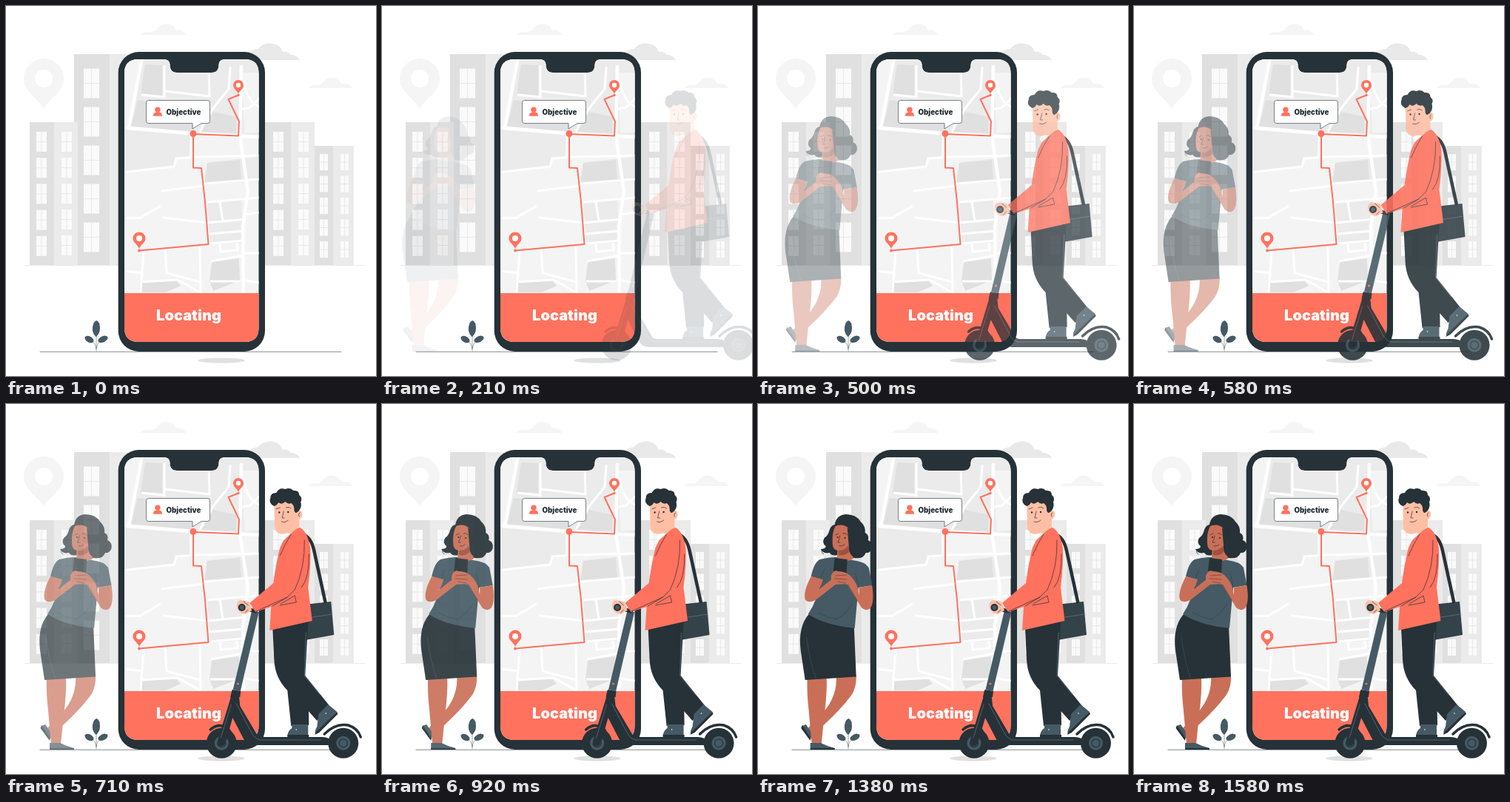
An HTML page for the animation above (1620 ms loop, 500x500 px).

```html
<!DOCTYPE html>
<html lang="en">
<head>
<meta charset="utf-8">
<title>Locating</title>
<style>
html, body { margin: 0; width: 100%; height: 100%; overflow: hidden; background: #fff; }
svg { display: block; width: 100vw; height: 100vh; }
text { font-family: Inter, Roboto, sans-serif; font-weight: 900; }
.dk { fill: #263238; }
.md { fill: #455a64; }
.red { fill: #ff725e; }
.brown { fill: #ca6f57; }
.peach { fill: #ffbfa5; }
.ln { fill: none; stroke: #263238; stroke-width: .7; stroke-linecap: round; stroke-linejoin: round; }
.lt { fill: none; stroke: #78909c; stroke-width: .5; stroke-linecap: round; }
</style>
</head>
<body>
<svg viewBox="0 0 500 500" xmlns="http://www.w3.org/2000/svg">
<defs>
  <clipPath id="screen"><path d="M179 72H213Q221 72 221.500 79Q221.500 90 231 90H278Q287.500 90 287.500 79Q288 72 296 72H323Q341.500 72 341.500 91V435Q341.500 454 323 454H179Q160 454 160 435V91Q160 72 179 72Z"/></clipPath>
</defs>

<path fill="#f5f5f5" d="M182 39Q184 34 197 35Q203 34 206 29Q210 24 218 24Q227 25 229 32Q241 32 243 39Z"/>
<path fill="#e9e9e9" d="M323 73Q325 60 341 58Q346 50 358 50.500Q370 51 374 62Q380 60 385 66Q395 67 397 73Z"/>
<path fill="#f5f5f5" d="M409 111Q411 106 422 107Q427 106 430 101Q434 96 441 96.500Q450 98 453 105Q466 104 469 111Z"/>
<path fill="#f5f5f5" fill-rule="evenodd" d="M51 139C45 126 24 117 24 98A27 27 0 0 1 78 98C78 117 57 126 51 139ZM51 86A12 12 0 1 0 51 110A12 12 0 1 0 51 86Z"/>
<g id="city"></g>
<path stroke="#ebebeb" stroke-width="1" d="M25 350.500H485"/>
<ellipse cx="291" cy="479" rx="32" ry="3.500" fill="#e0e0e0"/>
<path class="ln" stroke-opacity=".8" d="M46 467.300H453"/>

<rect class="dk" x="151.700" y="62" width="198.300" height="405" rx="28"/>
<g clip-path="url(#screen)">
  <path fill="#f4f4f4" d="M155 70H345V460H155Z"/>
  <path fill="#ebebeb" d="M160 72H342V176L160 165ZM160 167L250 175V204L229 206L227 217L160 225ZM272 211L342 204V236L268 241ZM272 265L318 262L321 320L276 322Z"/>
  <path fill="#f4f4f4" d="M160 72H182L167 163H160ZM318 90H342V170L322 172ZM258 204L253 176L316 178L319 204Z"/>
  <path fill="#e0e0e0" d="M188 79L211 80V122L182 119ZM178 127L256 133L252 170L169 162ZM280 143L312 150L311 172L262 170ZM272 212L316 208L318 236L268 238ZM182 374L230 371L236 378L216 387H182ZM278 346L315 341L316 371L280 385L275 372Z"/>
  <g fill="none" stroke="#fff" stroke-width="3">
    <path stroke-width="4.500" d="M160 164.500L252 172L342 177M184 70L166 165M318 80L316 175L327 250L320 300L321 390"/>
    <path d="M183 120L214 123L214 80M214 115L275 122L274 80M303 82L301 112L280 138L262 170M250 175V205M160 224.500L227 217L230 206L258 204L342 202M268 240L342 234M342 125L330 137L316 140M321 100Q326 130 342 136"/>
    <path d="M160 286.500H181L209 270M210 250L268 243M212 286L272 293L324 288M272 265L342 259M289 265L293 290M274 308L322 304M276 321L321 317M186 331L182 388M215 327L217 361L263 373M262 323L263 388M182 373L232 370L264 388M277 345L320 337M276 372L317 372M318 370L342 374M160 358L185 361M321 334H342M322 282L342 279M289 322L290 332L313 330L312 320"/>
  </g>
  <rect class="red" x="155" y="388" width="190" height="70"/>
</g>
<text x="247" y="425" text-anchor="middle" font-size="20" fill="#fff">Locating</text>
<path fill="none" stroke="#ff725e" stroke-width="2" stroke-linejoin="round" d="M180 330.500L273.500 322L269 265L264 219L253 218.500V173L314 175.500L315 156L300.500 126L314 120.500"/>
<g class="red">
  <circle cx="180" cy="330.500" r="1.900"/><circle cx="314" cy="120.500" r="1.700"/><circle cx="253" cy="172.500" r="4.500"/>
  <path d="M180 328C178 322 171.500 320 171.500 314A8.500 8.500 0 0 1 188.500 314C188.500 320 182 322 180 328Z"/>
  <path d="M314 118.500C312 114 307 112 307 107A7 7 0 0 1 321 107C321 112 316 114 314 118.500Z"/>
</g>
<circle cx="180" cy="314" r="4" fill="#fff"/><circle cx="314" cy="107" r="3.200" fill="#fff"/>
<path fill="#fff" stroke="#263238" stroke-width=".6" d="M192.500 127.500H272.500Q275.500 127.500 275.500 130.500V155.500Q275.500 158.500 272.500 158.500H264L252 166V158.500H192.500Q189.500 158.500 189.500 155.500V130.500Q189.500 127.500 192.500 127.500Z"/>
<g class="red"><circle cx="205" cy="140.300" r="3.700"/><path d="M199 148.800Q199 143.800 203 143.800H207Q211 143.800 211 148.800Z"/></g>
<text class="dk" x="240" y="147" text-anchor="middle" font-size="9.700">Objective</text>

<path class="ln" stroke-opacity=".6" d="M122 466V444M122 463Q121 455 114 451M122 463Q123 455 130 451"/>
<g class="md">
  <path d="M121.500 447Q116 442 117 434Q118 426 122.500 425Q127 427 127 435Q127 443 121.500 447Z"/>
  <ellipse cx="112.500" cy="450.500" rx="6.500" ry="4" transform="rotate(30 112.500 450.500)"/>
  <ellipse cx="131" cy="450.300" rx="7" ry="4" transform="rotate(-25 131 450.300)"/>
</g>

<g id="woman" opacity="0">
  <path class="brown" d="M104 366L131 366Q132 386 121 398Q104 420 70 449L64 440L86 417Q106 395 104 366Z"/>
  <path class="md" d="M58 435L63 433L72 446L69 454L65 449Z"/>
  <path class="dk" d="M58 434L56.500 438L66 451L69 455V451Z"/>
  <path class="brown" d="M65 368H91Q92 390 88 420L84 460H71L67 415Q64 390 65 368Z"/>
  <path class="md" d="M69 458H83Q93 463 102 465V467H69Z"/><path class="dk" d="M69 465H102V467H69Z"/>
  <path class="dk" d="M68 283Q52 300 56 333L62 373L131 368.500L128 298Z"/>
  <path class="lt" stroke-opacity=".45" d="M64 315Q68 347 77 372"/>
  <path class="md" d="M82 210Q94 207 104 207L126 211Q143 213 148 221L152.500 245L134 248L129 303Q89 299 66 284Q79 265 83 237L70 233Q74 214 82 210Z"/>
  <path class="ln" stroke-opacity=".5" d="M83 237Q85 229 88 224M134 247L130 229M79 282Q92 289 105 291M126 270Q115 286 104 291"/>
  <path class="dk" d="M102 163Q104 150 117 149Q131 149 137 159Q144 165 143 174Q149 177 147 184Q154 187 152.500 195Q150 202 144 201Q141 210 128 208L106 204Q98 206 95 201Q86 203 83 196Q90 196 90 192Q84 188 88 181Q93 178 95 170Q97 164 102 163Z"/>
  <path class="brown" d="M106 192L122 188L127 209Q118 216 105 208Z"/>
  <path fill="#9f503e" d="M107 197Q115 196 120 190L121 200Q115 206 107 204Z"/>
  <path class="brown" d="M103 165Q113 161 121 168Q126 178 121 190Q116 199 106 198Q99 197 99 188Q98 174 103 165Z"/>
  <path class="dk" d="M119 167Q129 172 127 183Q134 194 127 206Q120 202 121 191Z"/>
  <g class="ln"><path d="M109 178Q108 185 106 187H109M108 192Q112 193 115 190M103 177L107 175M113 175Q117 174 119 177"/><path d="M86 196Q82 200 87 203M145 184Q151 187 149 195"/></g>
  <circle class="dk" cx="106" cy="180" r="1.100"/><circle class="dk" cx="116" cy="181" r="1.100"/>
  <path class="brown" d="M70 233L86 237Q84 246 79 252L99 236L110 230L119 234Q124 239 119 243L103 244L76 265Q66 270 62 264Q59 254 70 233Z"/>
  <path class="brown" d="M135 248L152.500 245Q156 268 150 276Q144 281 138 275L119 244L101 240Q99 235 104 231L116 228Q125 231 132 245L135 258Z"/>
  <path class="dk" d="M102 208L119 210L118 228L100 226Z"/>
  <path class="brown" d="M97 232Q101 223 106 226Q116 226 123 232Q125 240 117 243L103 243Q96 240 97 232Z"/>
  <path class="ln" stroke-opacity=".65" d="M103 232L118 231M102 236L118 237M106 240L117 242M120 244L132 265"/>
</g>

<g id="man" opacity="0">
  <path fill="#344249" d="M404 271L440 267L444 312L405 319Z"/>
  <path class="lt" d="M409 289L442 284"/>
  <path fill="none" stroke="#263238" stroke-width="4.500" d="M402 176Q413 180 417 198L432.500 269"/>
  <g id="wheels"></g>
  <path fill="none" stroke="#263238" stroke-width="3.500" stroke-linecap="round" d="M277 440Q287 431 299 437Q306 443 306 453M431 446Q446 431 463 434Q476 438 480 450"/>
  <path class="dk" d="M304 398L306 387L315 388L317 408L340 447Q342 450 347 450H425Q437 449 441 456L438 461H336Q327 461 322 453L307 424L297 459Q293 465 287 461V454Z"/>
  <path class="lt" d="M312 405L332 443Q336 452 344 454H426M305 406L291 451"/>
  <path class="md" d="M333 279L342.500 281L317.500 388L307.500 386Z"/>
  <path class="dk" d="M306.500 386L318 388L317 396L304 396Z"/>
  <circle class="red" cx="314" cy="378" r="1.500"/>
  <path fill="none" stroke="#263238" stroke-width="5" stroke-linecap="round" d="M318 275L338 280"/>
  <path class="dk" d="M366 300L409 294L405 367L438 408L421 428L390 393L368 365Z"/>
  <path class="md" d="M423 419L436 406L448 416Q439 426 431 435L419 446Q417 443 421 436Z"/>
  <path class="dk" d="M448 416L449 419L424 444L418 447L419 444Z"/>
  <path class="dk" d="M361 302L402 297L404 365Q410 386 410 434L386 435L381 387Q364 370 363 345Z"/>
  <path class="md" d="M387 433H409V448H381Q382 441 387 438Z"/><path class="dk" d="M381 447H410V450H381Z"/>
  <path class="lt" d="M406 309L404 367L425 393"/>
  <g fill="#fff"><circle cx="393" cy="440" r=".8"/><circle cx="433" cy="418" r=".8"/></g>
  <path class="peach" d="M379 157L397 155V172L380 181L375 176Z"/>
  <path fill="#fff" d="M375 174L386 175L396 167L398 172L377 188L373 180Z"/>
  <path class="red" d="M376 184L387 174Q393 168 398 167Q409 173 412 196Q413 216 409 248L414.500 293L357 306L359 274L338 281L330 269L362 242Q366 213 371 194Z"/>
  <path class="ln" d="M404 184Q405 221 391 251L381 261L339 280M386 176Q378 188 371 205M361 273L381 261M372 270L391 259L393 268L371 272M410 203Q411 235 400 248"/>
  <path class="peach" d="M329 267L333 279L324 284Q315 283 313 276Q311 267 317 265Z"/>
  <circle class="dk" cx="319.500" cy="275" r="5"/><circle class="md" cx="319.500" cy="275" r="3"/>
  <path class="ln" d="M322 267L328 272M324 282L328 278"/>
  <path class="peach" d="M363 131L392 128L394 145Q401 142 401 149Q401 156 395 156Q393 168 384 173Q376 177 370 175Q365 173 364 167Z"/>
  <path class="dk" d="M363 138Q355 134 358 127Q358 120 366 120Q370 112 378 115Q385 112 389 117Q397 116 397 123Q402 127 399 132Q401 140 396 145L393 147Q390 147 390 141Q390 137 386 134Q382 136 378 132Q373 137 369 133Q367 137 363 138Z"/>
  <path class="ln" d="M376 145L374 154L377 154M373 159Q378 161 382 157M366 142L371 140M379 140Q383 138 386 141M398 147Q395 148 397 152"/>
  <circle class="dk" cx="370" cy="146.500" r="1.200"/><circle class="dk" cx="382" cy="146" r="1.200"/>
</g>
</svg>
<script>
const $ = id => document.getElementById(id);
const rect = (x, y, w, h, fill) => `<rect x="${x}" y="${y}" width="${w}" height="${h}" fill="${fill}"/>`;

function windows(x, y, w, h, step) {
  let s = '';
  for (let i = 0; i < 5; i++) {
    const top = y + i * step;
    s += rect(x, top, w, h, '#fafafa') +
      `<path stroke="#dedede" stroke-width=".6" d="M${x + w / 2} ${top}v${h}M${x} ${top + h / 2}h${w}"/>`;
  }
  return s;
}

function tower(x, mid, end, top) {
  return rect(x, top, mid - x, 350 - top, '#e0e0e0') + rect(mid, top, end - mid, 350 - top, '#ebebeb');
}

$('city').innerHTML =
  tower(92, 140.5, 165, 65) + windows(105, 84.5, 21, 40, 52) +
  tower(32, 65, 97, 157) + windows(41, 170, 14, 27, 35.2) + windows(75, 170, 14, 27, 35) +
  tower(345, 385, 417, 157) + windows(361, 170, 14, 27, 35.2) + windows(395, 170, 14, 27, 35) +
  tower(417, 442, 470, 189) + windows(424, 200, 11, 22, 29.5) + windows(452, 200, 11, 22, 29.5);

$('wheels').innerHTML = [292, 456.5].map(x =>
  `<circle class="dk" cx="${x}" cy="458.300" r="20.500"/>
   <circle class="md" cx="${x}" cy="458.300" r="9.500"/>
   <circle cx="${x}" cy="458.300" r="5.500" fill="none" stroke="#263238" stroke-width="1.200"/>`).join('');

// Cubic Bezier coordinate with end points 0 and 1
const curve = (a, b, s) => 3 * (1 - s) * (1 - s) * s * a + 3 * (1 - s) * s * s * b + s * s * s;

function ease(x) {
  if (x >= 1) return 1;
  let lo = 0, hi = 1;
  for (let i = 0; i < 24; i++) {
    const m = (lo + hi) / 2;
    if (curve(.36, .5, m) < x) lo = m; else hi = m;
  }
  return curve(-.01, 1.38, lo);
}

function slide(id, from, p) {
  const el = $(id);
  el.setAttribute('transform', `translate(${(from * (1 - p)).toFixed(2)} 0)`);
  el.setAttribute('opacity', Math.max(0, Math.min(1, p)).toFixed(3));
}

const LOOP = 1620;
function draw(now) {
  const t = now % LOOP;
  slide('man', 30, ease(t / 1000));
  slide('woman', -30, ease(t / 1540));
}

const start = performance.now();
function tick() {
  draw(performance.now() - start);
  requestAnimationFrame(tick);
}
draw(0);
requestAnimationFrame(tick);
</script>
</body>
</html>
```
